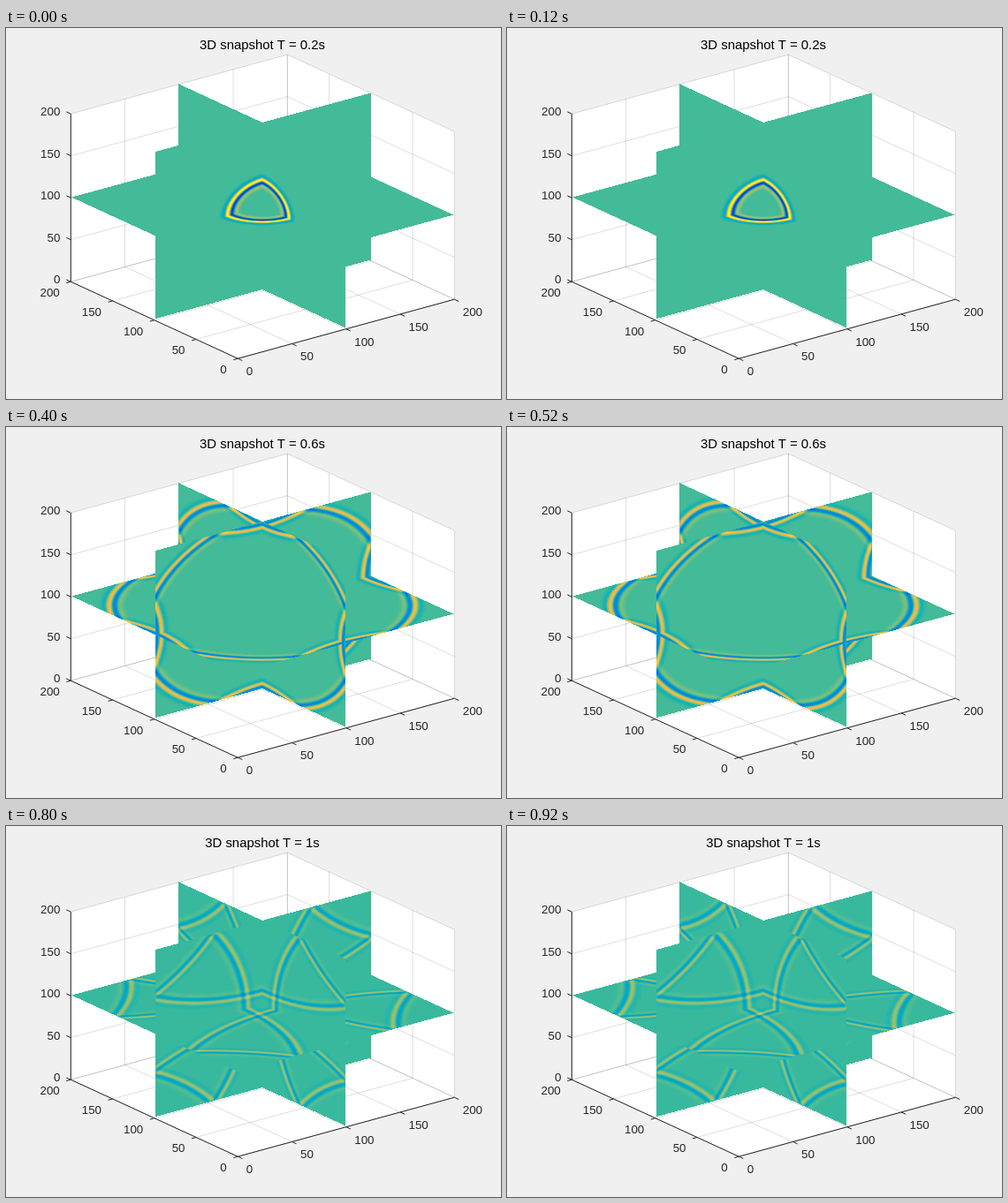
Recreate the animation shown at these times as an HTML page with a canvas. Size 560x420 px, loop 1 s.

```html
<!DOCTYPE html>
<html lang="en">
<head>
<meta charset="utf-8">
<title>3D wave snapshots</title>
<style>
html, body { margin: 0; width: 100%; height: 100%; overflow: hidden; background: #f0f0f0; }
canvas { display: block; }
</style>
</head>
<body>
<canvas id="stage" width="560" height="420"></canvas>
<script>
const W = 560, H = 420, STEP = 200;
const ctx = document.getElementById('stage').getContext('2d');

// Screen vectors for one unit of x, y and z; the box is 200 units wide.
const AX = [[1.225, -0.335], [-0.945, -0.435], [0, -0.95]];
const ORIGIN = [262.3, 374.2];
const CENTER = [290, 202];
const VIEW = [-0.771, -1, 0.73];
const MIN = -99, MAX = 100;

const PARULA = [
  [53, 42, 135], [50, 67, 186], [3, 99, 225], [13, 117, 220], [20, 133, 212], [9, 152, 209],
  [6, 167, 198], [22, 177, 180], [56, 185, 158], [101, 190, 134], [146, 191, 115], [183, 189, 100],
  [217, 186, 86], [248, 187, 68], [252, 206, 46], [245, 228, 29], [250, 259, 9]
];
const palette = Array.from({ length: 64 }, (_, i) => {
  const k = i >> 2, f = (i & 3) / 4;
  return PARULA[k].map((c, j) => Math.min(255, c + (PARULA[k + 1][j] - c) * f));
});

const shots = [
  { time: '0.2', base: 0.524, gain: 1 },
  { time: '0.4', base: 0.508, gain: 1 },
  { time: '0.6', base: 0.524, gain: 0.58 },
  { time: '0.8', base: 0.524, gain: 0.36 },
  { time: '1', base: 0.508, gain: 0.29 }
];

const SIGMA = 2.6, PERIOD = 205, PEAK = 1.38;
const frontRadius = n => 40 * n + 30;

function pulse(r, R) {
  const x = (r - R) / SIGMA;
  if (Math.abs(x) > 5) return 0;
  return (3 * x - x * x * x) * Math.exp(-x * x / 2) / PEAK;
}

// Periodic medium: the wave plus its copies one period away.
function field(u, v, R) {
  let sum = 0;
  for (let i = -PERIOD; i <= PERIOD; i += PERIOD)
    for (let j = -PERIOD; j <= PERIOD; j += PERIOD)
      sum += pulse(Math.hypot(u - i, v - j), R);
  return sum;
}

const inside = t => t >= MIN && t <= MAX;

// Nearest hit of the viewing ray with the three middle planes.
function hit(X, Y) {
  let best = null;
  for (let k = 0; k < 3; k++) {
    const i = (k + 1) % 3, j = (k + 2) % 3, p = AX[i], q = AX[j];
    const det = p[0] * q[1] - p[1] * q[0];
    const u = (X * q[1] - Y * q[0]) / det;
    const v = (p[0] * Y - p[1] * X) / det;
    if (!inside(u) || !inside(v)) continue;
    const depth = u * VIEW[i] + v * VIEW[j];
    if (!best || depth > best.depth) best = { u, v, depth };
  }
  return best;
}

const hits = [];
for (let y = 0; y < H; y++)
  for (let x = 0; x < W; x++) {
    const h = hit(x + 0.5 - CENTER[0], y + 0.5 - CENTER[1]);
    if (h) hits.push([(y * W + x) * 4, h.u, h.v]);
  }

function renderSlices(shot, n) {
  const R = frontRadius(n);
  const cv = document.createElement('canvas');
  cv.width = W;
  cv.height = H;
  const c = cv.getContext('2d'), img = c.createImageData(W, H);
  for (const [at, u, v] of hits) {
    const level = Math.floor((shot.base + field(u, v, R) * shot.gain / 2) * 64);
    img.data.set(palette[Math.max(0, Math.min(63, level))], at);
    img.data[at + 3] = 255;
  }
  c.putImageData(img, 0, 0);
  return cv;
}

const project = (x, y, z) => [0, 1].map(i =>
  ORIGIN[i] + x * AX[0][i] + y * AX[1][i] + z * AX[2][i]);

function path(points) {
  ctx.beginPath();
  points.forEach(p => ctx.lineTo(...p));
}

function line(...points) {
  path(points);
  ctx.stroke();
}

function drawBox() {
  const P = project;
  ctx.fillStyle = '#fff';
  path([P(0, 0, 0), P(200, 0, 0), P(200, 0, 200), P(200, 200, 200), P(0, 200, 200), P(0, 200, 0)]);
  ctx.fill();
  ctx.lineWidth = 1;
  ctx.strokeStyle = 'rgba(38,38,38,0.15)';
  for (let t = 0; t <= 200; t += 50) {
    line(P(t, 0, 0), P(t, 200, 0), P(t, 200, 200));
    line(P(0, t, 0), P(200, t, 0), P(200, t, 200));
    line(P(0, 200, t), P(200, 200, t), P(200, 0, t));
  }
}

function label(text, x, y, align) {
  ctx.textAlign = align;
  ctx.fillText(text, x, y);
}

function drawAxes() {
  const P = project;
  ctx.strokeStyle = ctx.fillStyle = '#262626';
  ctx.font = '13.33px "Liberation Sans", Arial, sans-serif';
  ctx.textBaseline = 'alphabetic';
  line(P(200, 0, 0), P(0, 0, 0), P(0, 200, 0), P(0, 200, 200));
  for (let t = 0; t <= 200; t += 50) {
    const x = P(t, 0, 0), y = P(0, t, 0), z = P(0, 200, t);
    line(x, [x[0] + 5, x[1] + 2.3]);
    line(y, [y[0] - 5, y[1] + 1.4]);
    line(z, [z[0] - 5, z[1] - 2.3]);
    label(t, x[0] + 9.5, x[1] + 19, 'left');
    label(t, y[0] - 12.6, y[1] + 17, 'right');
    label(t, z[0] - 12, z[1] + 2, 'right');
  }
}

function drawTitle(time) {
  ctx.fillStyle = '#000';
  ctx.font = '14.9px "Liberation Sans", Arial, sans-serif';
  label(`3D snapshot T = ${time}s`, 290, 24, 'center');
}

const slices = shots.map(renderSlices);

function draw(now) {
  const n = Math.floor(now / STEP) % shots.length;
  ctx.fillStyle = '#f0f0f0';
  ctx.fillRect(0, 0, W, H);
  drawBox();
  drawAxes();
  ctx.drawImage(slices[n], 0, 0);
  drawTitle(shots[n].time);
}

const start = performance.now();
function tick() {
  draw(performance.now() - start);
  requestAnimationFrame(tick);
}
tick();
</script>
</body>
</html>
```
